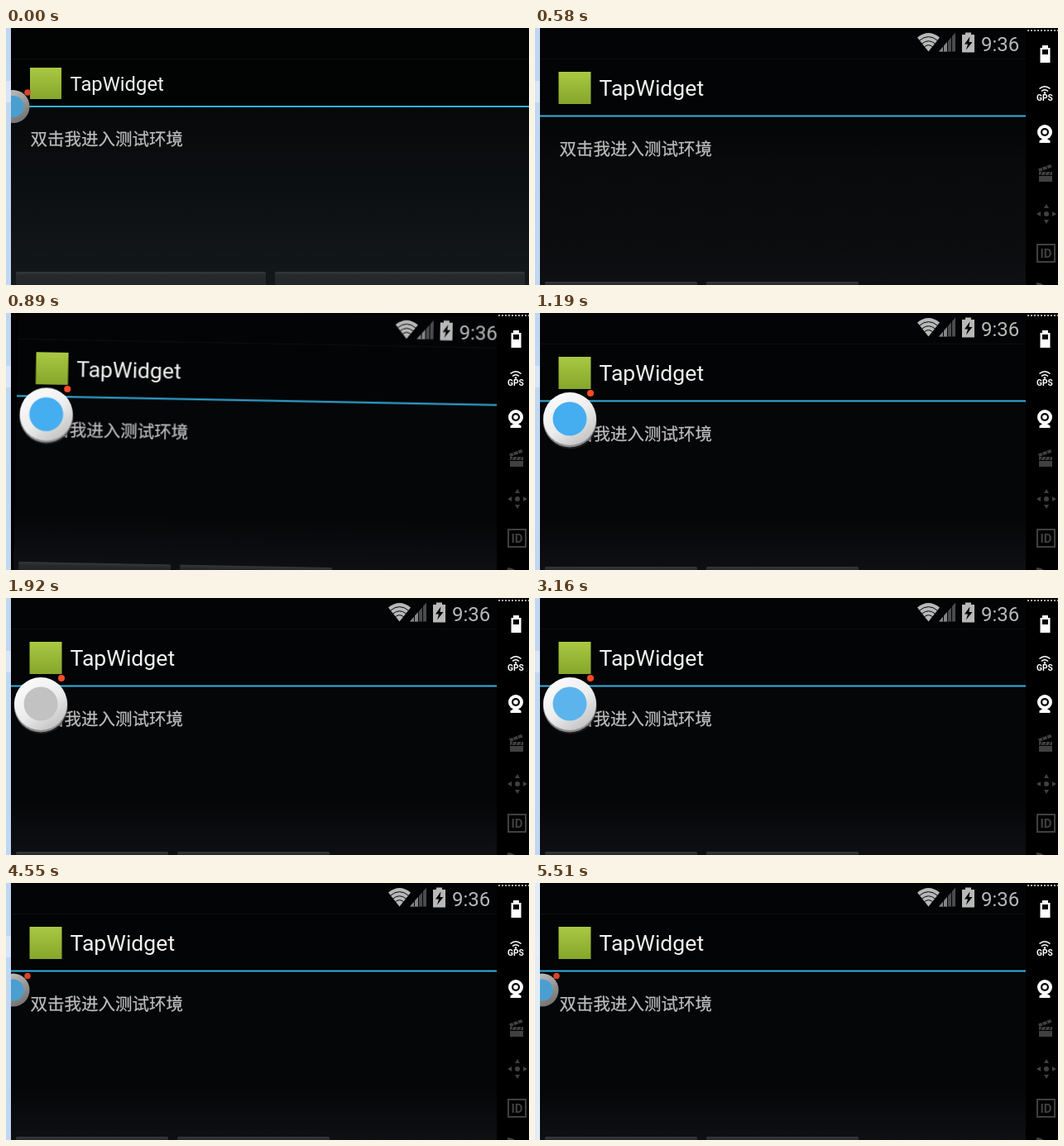
Recreate the animation shown at these times as an HTML page. Size 632x311 px, loop 5.61 s.

```html
<!DOCTYPE html>
<html lang="zh-CN">
<head>
<meta charset="utf-8">
<style>
html, body { margin: 0; width: 100%; height: 100%; overflow: hidden; background: #000; }
svg { display: block; width: 632px; height: 311px; }

.title { font-family: Roboto, sans-serif; fill: #f2f2f2; }
.hint { font: 20.5px "Noto Sans CJK SC", "Noto Sans CJK", sans-serif; fill: #bdbdbd; stroke: #bdbdbd; stroke-width: .25px; }
.clock { font: 24px Roboto, sans-serif; fill: #b8b8b8; }
.label { font-family: Roboto, sans-serif; font-weight: 700; text-anchor: middle; }

/* One 5610 ms loop, every change is a hard cut */
.landscape, .portrait, .panel, .wide, .narrow, .early, .settled,
.ball, .docked, .mark, .edge, .screen {
  animation: 5610ms step-end infinite;
}
.landscape { animation-name: until-turn; }
.portrait { animation-name: after-turn; }
.panel, .narrow { animation-name: after-resize; }
.wide { animation-name: until-resize; }
.early { animation-name: until-spin; }
.settled { animation-name: after-spin; }
.ball { animation-name: ball; }
.docked { animation-name: docked; }
.mark { animation-name: pulse; }
.edge { animation-name: edge; }
.screen { animation-name: spin; transform-origin: 335px 475px; }

@keyframes until-resize { 0% { opacity: 1 } 7.664%, 100% { opacity: 0 } }
@keyframes after-resize { 0% { opacity: 0 } 7.664%, 100% { opacity: 1 } }
@keyframes until-turn { 0% { opacity: 1 } 10.338%, 100% { opacity: 0 } }
@keyframes after-turn { 0% { opacity: 0 } 10.338%, 100% { opacity: 1 } }
@keyframes until-spin { 0% { opacity: 1 } 13.19%, 100% { opacity: 0 } }
@keyframes after-spin { 0% { opacity: 0 } 13.19%, 100% { opacity: 1 } }
@keyframes ball { 0% { opacity: 0 } 13.19% { opacity: 1 } 81.105%, 100% { opacity: 0 } }
@keyframes docked { 0% { opacity: 0 } 81.105%, 100% { opacity: 1 } }
@keyframes edge { 0% { fill: #c0d7f3 } 98.217%, 100% { fill: #e2ecf8 } }
@keyframes spin {
  0% { transform: none }
  13.19% { transform: rotate(5deg) }
  15.864% { transform: rotate(1.09deg) }
  18.538% { transform: rotate(.2deg) }
  21.212%, 100% { transform: none }
}
@keyframes pulse {
  0% { fill: #45aef0 }
  28.877% { fill: #5bb5ec }
  31.55% { fill: #9cc2da }
  34.224% { fill: #c2c2c2 }
  44.741% { fill: #86bfe2 }
  46.88% { fill: #45aef0 }
  56.327% { fill: #5bb5ec }
  59.179% { fill: #9cc2da }
  61.675% { fill: #c2c2c2 }
  72.727% { fill: #86bfe2 }
  75.579%, 100% { fill: #45aef0 }
}
</style>
</head>
<body>
<svg viewBox="0 0 632 311">
  <defs>
    <clipPath id="wideClip"><path d="M6 0H632V311H6z"/></clipPath>
    <clipPath id="tallClip"><path d="M6 0H593V311H6z"/></clipPath>
    <linearGradient id="wideBody" x2="0" y2="1">
      <stop stop-color="#07080a"/><stop offset="1" stop-color="#13181b"/>
    </linearGradient>
    <linearGradient id="earlyBody" x2="0" y2="1">
      <stop stop-color="#040506"/><stop offset=".3" stop-color="#090a0c"/><stop offset=".75" stop-color="#0b0c0e"/><stop offset="1" stop-color="#0f1013"/>
    </linearGradient>
    <linearGradient id="tallBody" x2="0" y2="1">
      <stop stop-color="#050608"/><stop offset=".68" stop-color="#050608"/><stop offset="1" stop-color="#0f1013"/>
    </linearGradient>
    <linearGradient id="button" x2="0" y2="1">
      <stop stop-color="#34383c"/><stop offset=".1" stop-color="#25292c"/><stop offset="1" stop-color="#202427"/>
    </linearGradient>
    <linearGradient id="icon" x2="0" y2="1">
      <stop stop-color="#a9c842"/><stop offset="1" stop-color="#86a62c"/>
    </linearGradient>
    <linearGradient id="shell" x2=".7" y2="1">
      <stop stop-color="#fff"/><stop offset=".6" stop-color="#ececec"/><stop offset="1" stop-color="#c4c4c4"/>
    </linearGradient>
    <linearGradient id="dimShell" x2=".5" y2="1">
      <stop stop-color="#c9c9c9"/><stop offset="1" stop-color="#777"/>
    </linearGradient>
    <g id="dock">
      <circle cx="8.5" cy="95" r="20" fill="url(#dimShell)"/>
      <circle cx="8.5" cy="95" r="13" fill="#4a9fd0"/>
      <circle cx="26" cy="78" r="3.8" fill="#d8432a"/>
    </g>
    <g id="halfButtons" fill="url(#button)">
      <rect x="12" width="184" height="44" rx="1.5"/>
      <rect x="207" width="184" height="44" rx="1.5"/>
    </g>
  </defs>

  <rect width="632" height="311"/>

  <g class="landscape" clip-path="url(#wideClip)">
    <path fill="#020303" d="M6 0H632V95H6z"/>
    <path fill="#0d0f10" d="M6 37H632V38H6z"/>
    <path fill="url(#wideBody)" d="M6 96H632V311H6z"/>
    <path fill="#33b0e0" d="M6 94H632V96H6z"/>
    <rect x="29" y="48" width="38" height="38" fill="url(#icon)"/>
    <text class="title" x="77.5" y="75.5" font-size="23.8">TapWidget</text>
    <text class="hint" x="29.5" y="142">双击我进入测试环境</text>
    <g class="wide" fill="url(#button)">
      <rect x="12" y="295" width="302" height="44" rx="1.5"/>
      <rect x="325" y="295" width="302" height="44" rx="1.5"/>
    </g>
    <use class="narrow" href="#halfButtons" y="295"/>
    <use href="#dock"/>
  </g>

  <g class="portrait" clip-path="url(#tallClip)">
    <path d="M6 0H593V311H6z"/>
    <g class="screen">
      <path fill="#030405" d="M6 0H593V107H6z"/>
      <path fill="#0c0e0f" d="M6 37H593V38H6z"/>
      <path class="early" fill="url(#earlyBody)" d="M6 107H593V313H6z"/>
      <path class="settled" fill="url(#tallBody)" d="M6 107H593V313H6z"/>
      <path fill="#0f1013" d="M6 313H593V1020H6z"/>
      <path fill="#33b0e0" d="M6 105.5H593V107.5H6z"/>

      <g fill="#b8b8b8" transform="translate(0 -.5)">
        <path d="M475.5 29L462 12Q475.5 1 489 12z"/>
        <g fill="none" stroke="#030405" stroke-width="1">
          <path d="M464.5 15.7Q475.5 6.5 486.5 15.7M467.5 19.5Q475.5 13 483.5 19.5M470.5 23.3Q475.5 19 480.5 23.3"/>
        </g>
        <path fill="#4a4b4c" d="M488 29L508 6V29z"/>
        <path fill="#858585" d="M488 29L498 17.5V29z"/>
        <path stroke="#030405" d="M493.5 20V29M498.5 15V29M503.5 10V29"/>
        <path d="M520 6H527V8.5H531V30H516V8.5H520z"/>
        <path fill="#030405" d="M525.5 11L519 20H523L521 27L528.5 17.5H524.5z"/>
      </g>
      <text class="clock" x="539" y="27.5">9:36</text>

      <rect x="28.5" y="53" width="39" height="39" fill="url(#icon)"/>
      <text class="title" x="77.5" y="82" font-size="26.6">TapWidget</text>
      <text class="hint" x="29.5" y="154">双击我进入测试环境</text>
      <use href="#halfButtons" y="307"/>

      <g class="ball">
        <circle cx="42.7" cy="132" r="32.5" fill="#333" opacity=".55"/>
        <circle cx="42" cy="130.3" r="32.2" fill="#8f8f8f"/>
        <circle cx="42" cy="128" r="32" fill="url(#shell)"/>
        <circle class="mark" cx="42" cy="128" r="20.5"/>
        <circle cx="67" cy="97" r="4" fill="#fb4c25"/>
      </g>
    </g>
    <g class="docked"><use href="#dock" y="34.5"/></g>
  </g>

  <g class="panel">
    <path d="M593 0H632V311H593z"/>
    <path stroke="#aaa" stroke-width="2" stroke-dasharray="2 2" d="M595 3H632"/>
    <g fill="#fff">
      <path d="M613 21H620V24H622.5V42H610.5V24H613z"/>
      <path fill="#000" d="M613 26H620V32H613z"/>
      <g fill="none" stroke="#fff" stroke-width="1.6">
        <path d="M609.5 73.5Q616 68 622.5 73.5M612 76.5Q616 73 620 76.5"/>
      </g>
      <circle cx="616" cy="78.5" r="1.3"/>
      <text class="label" x="616" y="88" font-size="10.2">GPS</text>
      <circle cx="616" cy="126" r="9"/>
      <circle cx="616" cy="126" r="5" fill="#000"/>
      <circle cx="616" cy="126" r="2.8"/>
      <path d="M613.5 134H618.5L622.5 136.5V139H609.5V136.5z"/>
    </g>
    <g fill="#404040">
      <path d="M609 174H625V186H609z"/>
      <path d="M608 170.5L623 165L624.5 168.5L609.5 174z"/>
      <path stroke="#000" d="M612 168L614.5 173M617.5 166L620 171M613 174L611 178M618 174L616 178M623 174L621 178M609 178.5H625"/>
      <circle cx="618" cy="225" r="3"/>
      <path d="M618 213L621 218H615zM618 237L621 232H615zM606 225L611 222V228zM630 225L625 222V228z"/>
      <rect x="607" y="262" width="21" height="21" fill="none" stroke="#404040" stroke-width="2"/>
      <text class="label" x="617.5" y="278" font-size="15">ID</text>
      <path d="M606 308Q611 308 615 311H606z"/>
    </g>
  </g>

  <rect class="edge" width="6" height="311"/>
  <rect y="64" width="6" height="26" fill="#e6effa" opacity=".6"/>
</svg>
</body>
</html>
```
